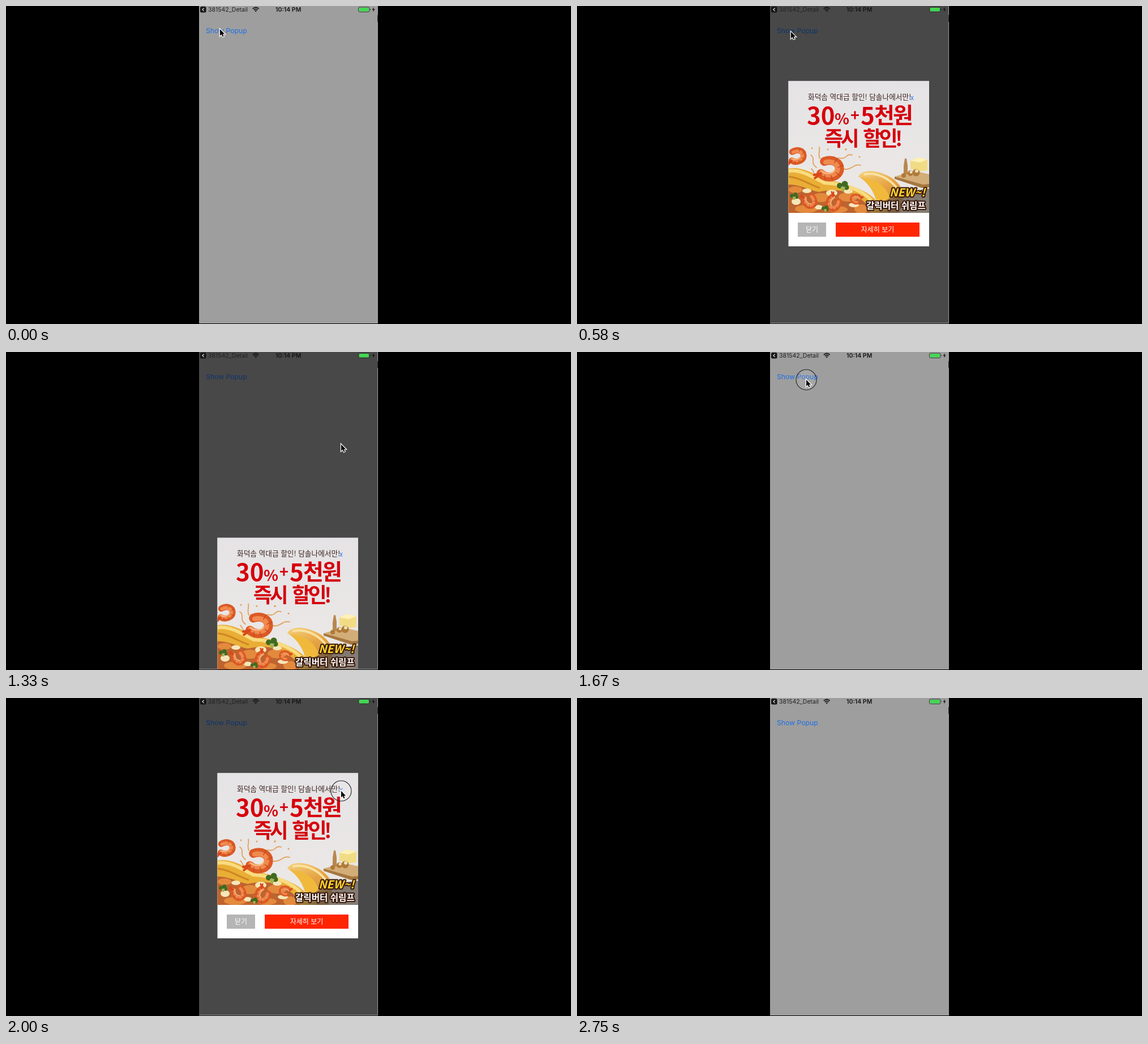
Recreate the animation shown at these times as an HTML page. Size 998 by 561 pixels, loop 2790 ms.

```html
<!DOCTYPE html>
<html lang="ko">
<head>
<meta charset="utf-8">
<title>Popup demo</title>
<style>
  html, body { margin: 0; width: 100%; height: 100%; overflow: hidden; background: #000; }
  svg { display: block; width: 100vw; height: 100vh; }
  text { font-family: Inter, Roboto, sans-serif; }
  .ko { font-family: "Noto Sans CJK KR", "Noto Sans CJK", sans-serif; }
  .red { fill: #d5000d; font-weight: 700; }
  .tag { fill: #fff; stroke: #3a1a0c; stroke-width: 4; stroke-linejoin: round; paint-order: stroke; font-weight: 900; }
  .mid { text-anchor: middle; }
</style>
</head>
<body>
<svg viewBox="0 0 998 561" xmlns="http://www.w3.org/2000/svg">
  <defs>
    <clipPath id="screen"><rect x="341" width="316" height="560"/></clipPath>
    <clipPath id="photo"><rect x="373.5" y="132.5" width="248.5" height="232.5"/></clipPath>
    <linearGradient id="wall" x1="0" y1="0" x2="0" y2="1">
      <stop offset="0" stop-color="#e5e3e5"/>
      <stop offset="1" stop-color="#ece9e6"/>
    </linearGradient>
    <linearGradient id="crust" x1="0" y1="0" x2="0.4" y2="1">
      <stop offset="0" stop-color="#f5d27f"/>
      <stop offset="0.5" stop-color="#e6a443"/>
      <stop offset="1" stop-color="#c88a3c"/>
    </linearGradient>
    <linearGradient id="shade" x1="0" y1="0" x2="1" y2="0.4">
      <stop offset="0" stop-color="#6a5238" stop-opacity="0.1"/>
      <stop offset="0.6" stop-color="#5d4f42" stop-opacity="0.75"/>
      <stop offset="1" stop-color="#6b6258" stop-opacity="0.8"/>
    </linearGradient>
    <g id="shrimp" fill="none" stroke-linecap="round">
      <path d="M-13 11C-3 19 16 14 17 1C17 -13 2 -16 -10 -10" stroke="#dc5a26" stroke-width="15"/>
      <path d="M-12 8C-2 15 13 11 14 1C14 -10 2 -13 -8 -9" stroke="#f08a4f" stroke-width="8"/>
      <path d="M-6 13L-5 20M4 12L8 19M12 6L20 11M14 -3L22 -8M7 -10L10 -18" stroke="#c64a1a" stroke-width="1.4"/>
      <path d="M-13 11L-24 15M-13 11L-22 20" stroke="#d9481c" stroke-width="4"/>
      <path d="M-12 7C-4 12 8 8 9 1" stroke="#f8c08e" stroke-width="2"/>
    </g>
    <g id="broccoli" fill="#3f6b21">
      <circle cx="-5" r="5"/><circle cx="4" cy="-3" r="5.5"/><circle cx="7" cy="3" r="4.5"/>
      <path d="M-3 2H5L3 10H-1Z" fill="#a4b35a"/>
    </g>
  </defs>

  <rect width="998" height="561"/>
  <g clip-path="url(#screen)">
    <rect x="341" width="316" height="560" fill="#9e9e9e"/>
    <text id="button" x="353" y="47.7" font-size="12.2" fill="#1f6fe5">Show Popup</text>
    <rect id="dim" x="341" width="315" height="559"/>
    <path d="M656.5 16V28" stroke="#333"/>

    <g id="popup">
      <rect x="373.5" y="132.5" width="248.5" height="291.5" fill="#fff"/>
      <g clip-path="url(#photo)">
        <rect x="373" y="132" width="250" height="234" fill="url(#wall)"/>

        <path d="M561 301L596 291L623 297V318L611 317Z" fill="#d3ad78"/>
        <path d="M561 301L611 315L623 314V320L609 321L561 305Z" fill="#a5773f"/>
        <path d="M589 273L602 267L619 271V290L604 292L589 287Z" fill="#f1dc85"/>
        <path d="M589 273L602 267L619 271L605 276Z" fill="#fff1b8"/>
        <path d="M577 297V282L579 269H582L584 281V297Z" fill="#b8874f"/>
        <g fill="#b07a38"><circle cx="589" cy="295" r="5"/><circle cx="599" cy="294" r="6.5"/><circle cx="577" cy="299" r="4"/></g>
        <g fill="#eee0b5"><circle cx="590" cy="293" r="2.5"/><circle cx="600" cy="291" r="3"/></g>

        <path d="M497 301C502 289 524 289 541 296C561 303 575 317 577 335L570 366H530C533 335 516 312 497 301Z" fill="url(#crust)"/>
        <path d="M501 303C521 303 543 314 551 334L549 366H531C532 335 516 314 501 303Z" fill="#f0b93c"/>
        <path d="M508 297C526 293 549 301 564 320" fill="none" stroke="#f9e1a0" stroke-width="4" stroke-linecap="round"/>

        <path d="M373 287C393 283 413 292 432 304C462 310 501 319 522 337C533 346 537 356 538 366H373Z" fill="#e9ae35"/>
        <path d="M374 291C396 288 415 301 437 312C478 314 510 327 526 350" fill="none" stroke="#f9dc80" stroke-width="6"/>
        <path d="M374 301C396 303 411 316 429 321" fill="none" stroke="#cf8524" stroke-width="3"/>
        <path d="M373 315C392 314 408 324 427 328C457 321 488 326 510 348L519 366H373Z" fill="#bd6430"/>
        <g fill="#e38a3d">
          <ellipse cx="386" cy="324" rx="12" ry="6"/><ellipse cx="431" cy="338" rx="15" ry="8"/>
          <ellipse cx="479" cy="337" rx="17" ry="8"/><ellipse cx="405" cy="358" rx="20" ry="7"/>
          <ellipse cx="461" cy="359" rx="17" ry="6"/><ellipse cx="502" cy="358" rx="12" ry="8"/>
        </g>
        <g fill="#f6e6b8">
          <ellipse cx="387" cy="345" rx="8" ry="6"/><ellipse cx="450" cy="330" rx="10" ry="6"/>
          <ellipse cx="427" cy="355" rx="7" ry="4"/><ellipse cx="489" cy="351" rx="9" ry="4"/>
          <ellipse cx="406" cy="326" rx="8" ry="4"/><ellipse cx="479" cy="327" rx="8" ry="4"/>
        </g>
        <use href="#shrimp" transform="translate(411 343) rotate(65) scale(.62)"/>
        <use href="#shrimp" transform="translate(454 347) rotate(120) scale(.66)"/>
        <use href="#shrimp" transform="translate(493 341) rotate(200) scale(.45)"/>
        <use href="#broccoli" transform="translate(469 317)"/>
        <use href="#broccoli" transform="translate(383 335) scale(.7)"/>
        <use href="#broccoli" transform="translate(438 357) scale(.6)"/>

        <g fill="none" stroke="#e2a05a" stroke-width="1.8" stroke-linecap="round">
          <path d="M423 285C411 276 422 269 413 263M429 269C425 260 430 255 428 249M462 268C478 272 474 259 486 263M468 287C486 292 487 277 501 281M425 302C416 296 420 292 414 287"/>
        </g>
        <g fill="#e2a05a"><circle cx="443" cy="253" r="1.5"/><circle cx="475" cy="253" r="1.8"/><circle cx="499" cy="266" r="1.5"/><circle cx="415" cy="251" r="1.4"/></g>
        <use href="#shrimp" transform="translate(446 286) rotate(8) scale(1.05)"/>
        <use href="#shrimp" transform="translate(388 264) rotate(-5) scale(.72)"/>

        <path d="M512 366L540 345L577 328L623 322V366Z" fill="url(#shade)"/>
        <text class="ko" x="408" y="164.8" font-size="12.7" font-weight="500" fill="#3d2422">화덕솜 역대급 할인! 담솔나에서만!</text>
        <g font-size="42">
          <text class="ko red" x="406" y="209">30</text>
          <text class="ko red" x="455" y="209" font-size="27" style="font-weight:900">%</text>
          <text class="ko red" x="483" y="203" font-size="27">+</text>
          <text class="ko red" x="501" y="209">5</text>
          <text class="ko red" x="525" y="207" font-size="39" letter-spacing="-3">천원</text>
          <text class="ko red" x="437" y="247" font-size="36" letter-spacing="-4.6" word-spacing="5.5">즉시 할인!</text>
        </g>
        <text class="ko tag" x="552" y="336" font-size="19.5" font-style="italic" style="fill:#ffd52b">NEW~!</text>
        <text class="ko tag" x="511" y="358" font-size="15.6">갈릭버터 쉬림프</text>
      </g>
      <text x="592" y="166" class="mid" font-size="11" fill="#1677ff">x</text>
      <rect x="390" y="382" width="50" height="25" fill="#b5b5b5"/>
      <rect x="457" y="382" width="148" height="25" fill="#ff2500"/>
      <g fill="#fff" font-size="12">
        <text class="ko mid" x="415" y="399">닫기</text>
        <text class="ko mid" x="531" y="399">자세히 보기</text>
      </g>
    </g>

    <g fill="#151515">
      <rect x="343" y="1" width="10.5" height="10.5" rx="2.5"/>
      <path d="M349.8 3.6L346.8 6.3L349.8 9" fill="none" stroke="#bbb" stroke-width="1.5"/>
      <text x="357" y="10" font-size="10.5" fill="#222">381542_Detail</text>
      <path d="M435.7 4.8Q441.2 0.2 446.7 4.8M437.8 7Q441.2 4.3 444.6 7" fill="none" stroke="#151515" stroke-width="1.7"/>
      <path d="M439.3 8.4Q441.2 7 443.1 8.4L441.2 10.5Z"/>
      <text class="mid" x="498.7" y="10" font-size="10.5" font-weight="600">10:14 PM</text>
      <rect x="622.5" y="2" width="19.5" height="8.5" rx="2" fill="none" stroke="#333" stroke-width="0.9"/>
      <rect x="623.6" y="3.1" width="17.3" height="6.3" rx="1" fill="#43d653"/>
      <path d="M643 4.7Q644.6 6.2 643 7.8Z"/>
      <path d="M650 2L646.6 6.8H648.8L648 10.5L651.6 5.5H649.3Z"/>
    </g>

    <circle id="ring" r="18" fill="#fff" fill-opacity="0.08" stroke="#222" stroke-width="1.1"/>
    <path id="cursor" d="M0 0V11.6L2.7 9.1L4.6 13.2L6.5 12.4L4.7 8.4H8.3Z" stroke="#fff" stroke-width="2.4" paint-order="stroke"/>
  </g>
</svg>
<script>
  const LOOP = 2790, DROP = 428.5, DIM = 0.54;
  const $ = id => document.getElementById(id);
  const [button, dim, popup, ring, cursor] = ['button', 'dim', 'popup', 'ring', 'cursor'].map($);

  // Tap that opens the popup, tap that closes it
  const visits = [{ open: 240, close: 1230 }, { open: 1670, close: 2010 }];
  // time, x, y
  const trail = [
    [0, 378, 41], [330, 378.5, 44], [960, 377, 48], [1000, 380, 52], [1180, 592, 163],
    [1400, 592, 163], [1610, 405, 49], [1730, 405, 49], [1880, 571.5, 162.5],
    [1930, 592, 164], [2230, 592, 164], [2480, 664, 178]
  ];

  const span = (t, from, length) => Math.min(1, Math.max(0, (t - from) / length));

  function pointAt(t) {
    const next = trail.findIndex(p => p[0] > t);
    if (next < 0) return trail[trail.length - 1].slice(1);
    const a = trail[next - 1], b = trail[next];
    const k = span(t, a[0], b[0] - a[0]);
    return [a[1] + (b[1] - a[1]) * k, a[2] + (b[2] - a[2]) * k];
  }

  function draw(t) {
    const { open, close } = visits[t < 1600 ? 0 : 1];
    const rise = 1 - (1 - span(t, open + 101, 217)) ** 2;
    const fall = span(t, close + 20, 120) ** 2;
    const shown = rise - fall;
    popup.setAttribute('transform', `translate(0 ${(DROP * (1 - shown)).toFixed(2)})`);
    popup.setAttribute('visibility', shown > 0 ? 'visible' : 'hidden');

    const shadow = span(t, open + 25, 55) - span(t, close + 115, 60);
    dim.setAttribute('opacity', DIM * shadow);
    const pressed = span(t, open + 20, 30) - span(t, open + 110, 80);
    button.setAttribute('opacity', 1 - 0.75 * pressed);

    const place = `translate(${pointAt(t).map(v => v.toFixed(2)).join(' ')})`;
    cursor.setAttribute('transform', place);
    ring.setAttribute('transform', place);
    const tapped = [open, close].some(at => t >= at - 30 && t < at + 50);
    ring.setAttribute('visibility', tapped ? 'visible' : 'hidden');
  }

  const start = performance.now();
  function tick() {
    draw((performance.now() - start) % LOOP);
    requestAnimationFrame(tick);
  }
  tick();
</script>
</body>
</html>
```
